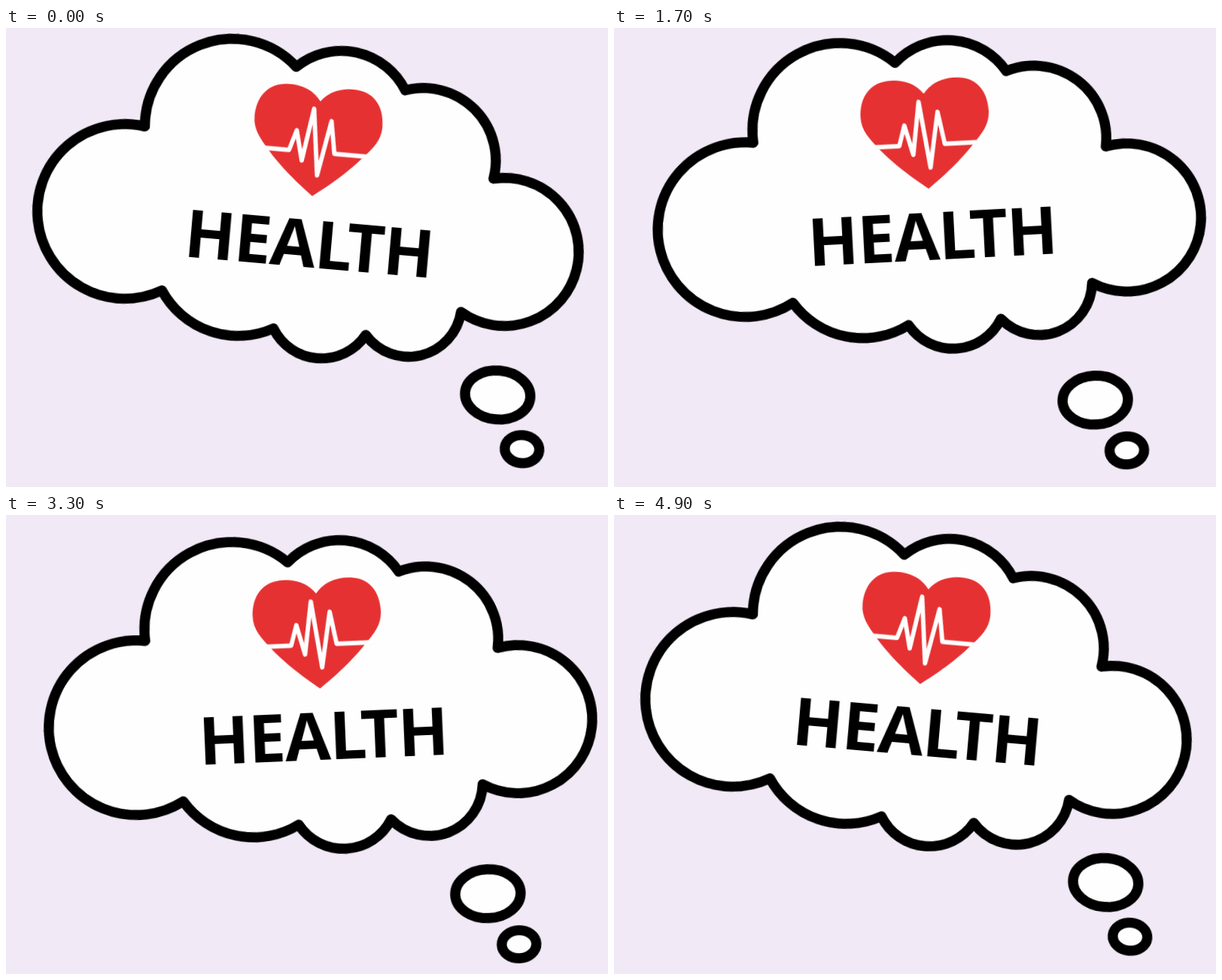
An HTML page without scripts that plays this animation: 800 by 611 pixels, repeating every 5000 ms.

```html
<!DOCTYPE html>
<html lang="en">
<head>
<meta charset="utf-8">
<title>Health thought bubble</title>
<style>
  html, body { margin: 0; width: 100%; height: 100%; overflow: hidden; background: #f1e9f5; }
  svg { display: block; width: 100%; height: 100%; }
  .outline { fill: #fefefe; stroke: #000; stroke-width: 13.4; stroke-linejoin: round; }
  .pulse { fill: none; stroke: #fefefe; stroke-width: 5.8; stroke-linejoin: round; }
  text { font: 700 88px "Open Sans", "Noto Sans", sans-serif; letter-spacing: -1.2px; font-kerning: none; }

  /* Tilt follows a cosine, bob a sine: together one 5 s sway. */
  .bob, .tilt { animation: 2.5s cubic-bezier(.364, 0, .636, 1) infinite alternate; }
  .bob { animation-name: bob; animation-delay: -3.8s; }
  .tilt { animation-name: tilt; animation-delay: -.05s; }
  .cloud { --rise: -20px; }
  .cloud .tilt { transform-origin: 395px 152px; }
  .trail { --rise: -11.4px; }
  .trail .tilt { transform-origin: 726px 600px; }
  @keyframes bob { from { transform: translateY(var(--rise)); } to { transform: none; } }
  @keyframes tilt { from { transform: rotate(5deg); } to { transform: rotate(-5deg); } }
</style>
</head>
<body>
<svg viewBox="0 0 800 611">
  <g class="trail bob">
    <g class="tilt outline">
      <ellipse cx="644.5" cy="501.3" rx="43.5" ry="32.5"/>
      <ellipse cx="683" cy="570.3" rx="23" ry="18.7"/>
    </g>
  </g>
  <g class="cloud bob">
    <g class="tilt">
      <path class="outline" d="M184.5 160
        A116 116 0 0 1 378 63.5
        A95 95 0 0 1 525 82
        A96.4 96.4 0 0 1 652 189
        A98.6 98.6 0 1 1 624.5 369.5
        A70.5 70.5 0 0 1 501 411
        A71 71 0 0 1 378 413
        A115 115 0 0 1 226 375.5
        A116.2 116.2 0 1 1 184.5 160Z"/>
      <path fill="#e63132" d="M414 106.5
        C405 95 393 87 371 87 C343 87 328.5 107 328.5 134
        C328.5 151 339 163 351 177 C367 196 395 219 414 233
        C433 219 460 196 476 177 C489 163 499 151 499 134
        C499 107 485 87 457 87 C435 87 423 95 414 106.5Z"/>
      <path class="pulse" d="M335 174.5H378L386 147.5 396 187 406.5 117 418 205 431 131.5 438.5 174.5H492"/>
      <text x="250" y="328" dx="0 0 0 0 -7">HEALTH</text>
    </g>
  </g>
</svg>
</body>
</html>
```
